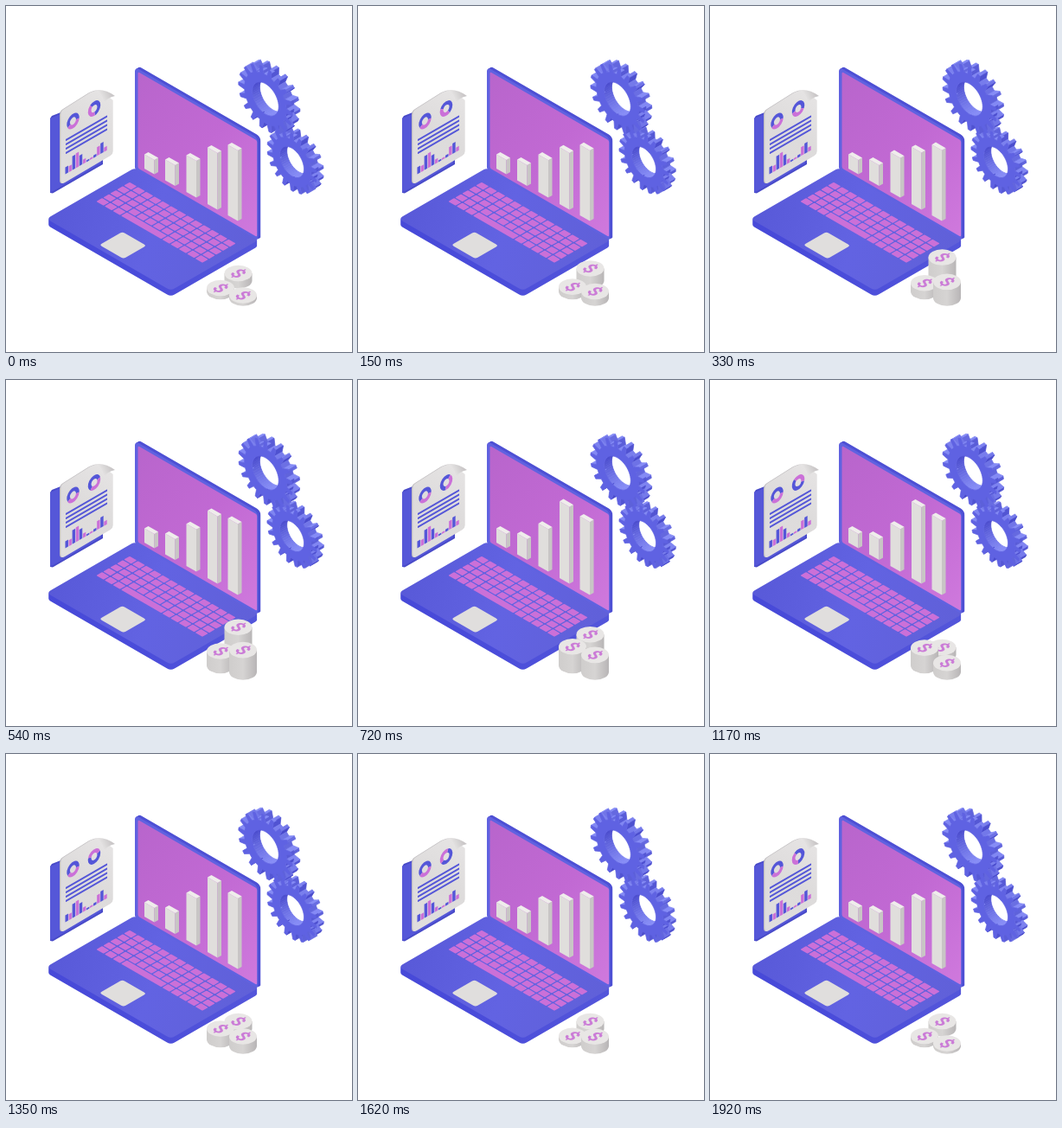
An HTML page with a canvas for the animation above (1.95 s loop, 400 by 400 pixels).

```html
<!DOCTYPE html>
<html lang="en">
<head>
<meta charset="utf-8">
<title>Business analytics</title>
<style>
  html, body { margin: 0; width: 100%; height: 100%; overflow: hidden; background: #fff; }
  canvas { display: block; width: 400px; height: 400px; }
</style>
</head>
<body>
<canvas id="stage"></canvas>
<script>
const LOOP = 1950, STEP = 30, TAU = Math.PI * 2;
const CX = 0.866, CY = 0.5;
const canvas = document.getElementById('stage');
const ctx = canvas.getContext('2d');
const ratio = window.devicePixelRatio || 1;
canvas.width = canvas.height = 400 * ratio;

const BLUE = '#5456d8', PINK = '#cb70d8';

// Isometric planes as canvas matrices
const FLOOR = [CX, CY, -CX, CY];
const SCREEN = [CX, CY, 0, 1];
const PAPER = [CX, -CY, 0, 1];

function onPlane(plane, x, y, draw) {
  ctx.save();
  ctx.transform(...plane, x, y);
  draw();
  ctx.restore();
}

function poly(points, fill) {
  ctx.beginPath();
  points.forEach(([x, y]) => ctx.lineTo(x, y));
  ctx.closePath();
  ctx.fillStyle = fill;
  ctx.fill();
}

function roundBox(x, y, w, h, r, fill) {
  ctx.beginPath();
  ctx.roundRect(x, y, w, h, r);
  ctx.fillStyle = fill;
  ctx.fill();
}

function ramp(x0, y0, x1, y1, ...colors) {
  const g = ctx.createLinearGradient(x0, y0, x1, y1);
  colors.forEach((c, i) => g.addColorStop(i / (colors.length - 1), c));
  return g;
}

// Smooth interpolation through [time, value] keys
function track(keys, t) {
  for (let i = 1; i < keys.length; i++) {
    const [t0, a] = keys[i - 1], [t1, b] = keys[i];
    if (t <= t1) {
      const u = (t - t0) / (t1 - t0);
      return a + (b - a) * u * u * (3 - 2 * u);
    }
  }
  return keys[keys.length - 1][1];
}

function drawBase() {
  // Stacked slabs give the rounded thickness
  for (let d = 7; d >= 0; d--) {
    onPlane(FLOOR, 149, 187 + d, () => {
      const side = ramp(0, 118, 166, 0, '#4749d8', '#4a4cda', '#5456da');
      const top = ramp(0, 118, 166, 0, '#5859d8', '#6263e2', '#6060d8');
      roundBox(0, 0, 166, 118, 5, d ? side : top);
    });
  }
  onPlane(FLOOR, 143, 203, () => {
    const cols = 13, rows = 5, w = 143 / cols, h = 46 / rows;
    for (let r = 0; r < rows; r++) {
      for (let c = 0; c < cols; c++) {
        const span = r === 4 && c === 3 ? 5 : 1;
        roundBox(c * w + 0.7, r * h + 0.7, w * span - 1.4, h - 1.4, 1, PINK);
        c += span - 1;
      }
    }
  });
  onPlane(FLOOR, 134.5, 261, () => roundBox(0, 0, 32, 30.5, 3, '#e0dedd'));
}

function drawLid() {
  for (let d = 4; d >= 0; d--) {
    onPlane(SCREEN, 149 + d * 0.8, 70.5 - d * 0.4, () =>
      roundBox(0, 0, 164, 118, [5, 5, 2, 2], d ? '#4e50d4' : '#6062e0'));
  }
  onPlane(SCREEN, 152.5, 76, () =>
    roundBox(0, 0, 159, 111.5, 2, ramp(0, 0, 159, 111, '#b865cc', '#c169d3', '#cf79dd')));
}

const bars = [
  { x: 160, base: 188, top: [[0, 171.5]] },
  { x: 184, base: 201.5, top: [[0, 177.5]] },
  { x: 208.5, base: 215, top: [[0, 172.5], [680, 165.5], [960, 172.5], [1350, 160.5], [1890, 172.5]] },
  { x: 233, base: 229, top: [[0, 163.5], [330, 163], [740, 140], [960, 139.5], [1300, 141], [1620, 163.5]] },
  { x: 256.5, base: 242, top: [[0, 160.5], [600, 160], [960, 150.5], [1350, 160.5]] }
];

function drawBar({ x, base, top }, t) {
  const y = track(top, t), w = 11.5, k = 6.6, d = 4.5, e = 2.6;
  poly([[x, y], [x + w, y + k], [x + w, base + k], [x, base]], '#e0dedc');
  poly([[x + w, y + k], [x + w + d, y + k - e], [x + w + d, base + k - e], [x + w, base + k]], '#c8c5c5');
  poly([[x, y], [x + d, y - e], [x + w + d, y + k - e], [x + w, y + k]], '#efedeb');
}

function donut(x, y, start) {
  onPlane(PAPER, x, y, () => {
    ctx.lineWidth = 4.4;
    [[BLUE, 0, 0.6], [PINK, 0.6, 1]].forEach(([color, a, b]) => {
      ctx.beginPath();
      ctx.arc(0, 0, 6.2, start + a * TAU, start + b * TAU);
      ctx.strokeStyle = color;
      ctx.stroke();
    });
  });
}

function drawPaper(t) {
  poly([[51, 130], [53, 127], [112, 104], [112, 183], [54, 216.5], [51, 216]], '#484ac8');
  poly([[51, 130], [110, 104], [110, 182], [51, 216]], '#5557d8');

  function sheet(dx, fill) {
    ctx.beginPath();
    ctx.moveTo(62 + dx, 126);
    ctx.quadraticCurveTo(62 + dx, 121, 66 + dx, 119);
    ctx.lineTo(93 + dx, 102);
    ctx.quadraticCurveTo(102 + dx, 96, 109 + dx, 98);
    ctx.lineTo(122.5 + dx, 109);
    ctx.lineTo(122.5 + dx, 168);
    ctx.quadraticCurveTo(122.5 + dx, 171, 119.5 + dx, 173);
    ctx.lineTo(67 + dx, 204);
    ctx.quadraticCurveTo(62 + dx, 207, 62 + dx, 201);
    ctx.closePath();
    ctx.fillStyle = fill;
    ctx.fill();
  }
  sheet(0, '#bfbcbf');
  sheet(1.2, ramp(62, 200, 123, 100, '#e0dede', '#dddbdb', '#e6e4e4'));

  // Curled corner
  ctx.beginPath();
  ctx.moveTo(102, 97.5);
  ctx.quadraticCurveTo(111, 98, 113, 112);
  ctx.quadraticCurveTo(117, 106, 126, 104);
  ctx.quadraticCurveTo(114, 95, 102, 97.5);
  ctx.fillStyle = ramp(106, 108, 122, 100, '#f0eeee', '#dcdada', '#c8c5c6');
  ctx.fill();

  donut(77.5, 133, 2.6);
  donut(102, 118.5, -2.3 - t / LOOP * TAU);

  onPlane(PAPER, 69, 154, () => {
    for (let i = 0; i < 4; i++) roundBox(0, i * 5, 55.5, 2.2, 0.5, BLUE);
  });
  onPlane(PAPER, 68.5, 194.5, () => {
    [8, 7, 16, 17, 12, 5, 2, 2, 3, 10, 12, 5].forEach((h, i) =>
      roundBox(i * 4.7, -h, 4, h, 0, i % 2 ? PINK : BLUE));
  });
}

const polar = (r, a) => [Math.cos(a) * r, Math.sin(a) * r];

function gearOutline(radius, angle) {
  const teeth = 18, pitch = TAU / teeth, points = [];
  for (let i = 0; i < teeth; i++) {
    [[-0.28, 0.78], [-0.13, 1], [0.13, 1], [0.28, 0.78]].forEach(([p, r]) =>
      points.push(polar(r * radius, angle + (i + p) * pitch)));
  }
  return points;
}

// Reversed winding, so its normals point into the opening
function holeOutline(radius) {
  return Array.from({ length: 48 }, (_, i) => polar(radius, -i / 48 * TAU));
}

// The depth axis runs along (1, -1) of the gear's own plane
function wallsOf(points) {
  return points.map((a, i) => {
    const b = points[(i + 1) % points.length];
    const len = Math.hypot(b[0] - a[0], b[1] - a[1]);
    return { a, b, nx: (b[1] - a[1]) / len, ny: (a[0] - b[0]) / len };
  }).filter(w => w.nx > w.ny);
}

function drawGear(x, y, radius, depth, angle) {
  const rim = gearOutline(radius, angle), hole = holeOutline(radius * 0.49);
  const far = w => w.a[0] + w.b[0] - w.a[1] - w.b[1];
  onPlane(SCREEN, x, y, () => {
    ctx.lineJoin = 'round';
    ctx.lineWidth = 0.7;
    const walls = [...wallsOf(rim), ...wallsOf(hole)].sort((p, q) => far(q) - far(p));
    for (const { a, b, nx, ny } of walls) {
      const light = Math.max(0, Math.min(1, 0.45 - ny * 0.5 - nx * 0.25));
      const color = `rgb(${72 + light * 62}, ${74 + light * 66}, ${204 + light * 42})`;
      poly([a, b, [b[0] + depth, b[1] - depth], [a[0] + depth, a[1] - depth]], color);
      ctx.strokeStyle = color;
      ctx.stroke();
    }
    ctx.beginPath();
    for (const outline of [rim, hole]) {
      outline.forEach(([px, py], i) => i ? ctx.lineTo(px, py) : ctx.moveTo(px, py));
      ctx.closePath();
    }
    ctx.fillStyle = ctx.strokeStyle = '#5f62e2';
    ctx.fill('evenodd');
    ctx.stroke();
  });
}

const coins = [
  { x: 268.5, y: 317.5, height: [[0, 8.5], [480, 32.5], [1050, 8.5]] },
  { x: 248, y: 330, height: [[0, 4], [960, 25], [1650, 4]] },
  { x: 274, y: 337.5, height: [[0, 3], [520, 25.5], [1000, 10], [1560, 11.5], [1890, 3]] }
];

function drawCoin({ x, y, height }, t) {
  const top = y - track(height, t), rx = 16, ry = 9.3;
  ctx.beginPath();
  ctx.ellipse(x, y, rx, ry, 0, 0, Math.PI);
  ctx.lineTo(x - rx, top);
  ctx.lineTo(x + rx, top);
  ctx.closePath();
  ctx.fillStyle = ramp(x - rx, 0, x + rx, 0, '#cfcdcc', '#d6d4d3', '#b8b5b6');
  ctx.fill();
  ctx.beginPath();
  ctx.ellipse(x, top, rx, ry, 0, 0, TAU);
  ctx.fillStyle = '#e8e6e5';
  ctx.fill();
  onPlane(FLOOR, x, top, () => {
    ctx.font = 'bold 20px Roboto, Arial, sans-serif';
    ctx.textAlign = 'center';
    ctx.fillStyle = '#cb7cd7';
    ctx.fillText('$', 0, 7);
  });
}

function frame(now) {
  const t = Math.floor(now / STEP) * STEP % LOOP;
  const turn = t / LOOP * Math.PI;
  ctx.setTransform(ratio, 0, 0, ratio, 0, 0);
  ctx.fillStyle = '#fff';
  ctx.fillRect(0, 0, 400, 400);
  drawPaper(t);
  drawBase();
  drawLid();
  bars.forEach(bar => drawBar(bar, t));
  drawGear(330.5, 180.5, 33, 9.5, 0.17 - turn);
  drawGear(300, 107.5, 36, 10, turn);
  coins.forEach(coin => drawCoin(coin, t));
  requestAnimationFrame(frame);
}
requestAnimationFrame(frame);
</script>
</body>
</html>
```
